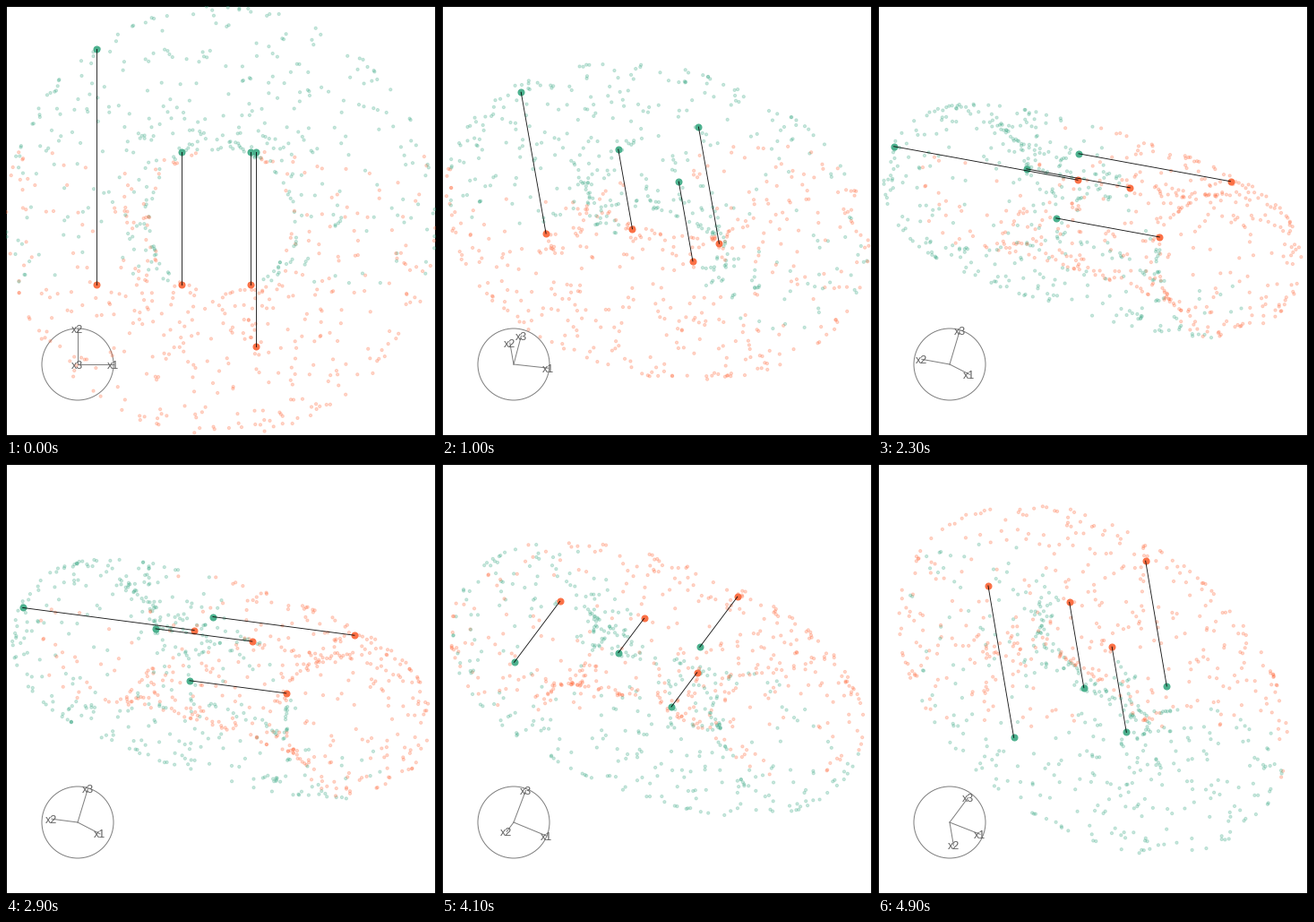
Recreate the animation shown at these times as a matplotlib script. Size 480x480 px, loop 5000 ms.

```python
import numpy as np
import matplotlib.pyplot as plt
from matplotlib.animation import FuncAnimation
from matplotlib.colors import to_rgba

SIZE, FRAMES, INTERVAL = 480, 50, 100
PX = 0.72  # points per pixel at 100 dpi
RING, TUBE, COUNT = 160, 80, 800
UPPER, LOWER = 77, -71
GREEN, ORANGE = "#3aa985", "#ff6a3c"
BIG_GREEN, BIG_ORANGE = "#4bb08d", "#fb7045"
HUB, ARM = np.array([80, 400]), 40


def basis(right, up):
    """Orthonormal 3x3 view from its two screen directions."""
    m = np.array([right, up, np.cross(right, up)])
    u, _, vt = np.linalg.svd(m)
    return u @ vt


def turn(a, b, t):
    """Constant-speed rotation from view a to view b; t may exceed 1."""
    d = b @ a.T
    angle = np.arccos(np.clip((np.trace(d) - 1) / 2, -1, 1))
    if angle < 1e-9:
        return a
    k = (d - d.T) / (2 * np.sin(angle))
    step = np.eye(3) + np.sin(angle * t) * k + (1 - np.cos(angle * t)) * k @ k
    return step @ a


def tour_stops():
    start = np.eye(3)
    tilt = basis((.972, -.106, .210), (-.106, .600, .793))
    side = basis((.832, -.469, .300), (-.225, .199, .953))
    far = basis((.623, -.728, .286), (-.323, .096, .943))
    back = basis((.897, -.312, .317), (-.322, .029, .947))
    under = basis((.921, -.195, .340), (-.377, -.259, .888))
    end = basis((.848, .107, .514), (-.332, -.646, .692))
    return [(0, start), (15, turn(start, tilt, 1.5)), (18, side),
            (25, turn(back, far, 1.5)), (29, far), (37, back),
            (41, under), (49, end)]


STOPS = tour_stops()


def view(frame):
    for (f0, a), (f1, b) in zip(STOPS, STOPS[1:]):
        if frame <= f1:
            return turn(a, b, (frame - f0) / (f1 - f0))
    return STOPS[-1][1]


def project(points, m):
    flat = points @ m[:2].T
    return np.column_stack([240 + flat[:, 0], 240 - flat[:, 1]])


def torus(rng):
    """Points uniform in both angles, so denser around the hole."""
    theta, phi = rng.uniform(-np.pi, np.pi, (2, COUNT))
    rho = RING + TUBE * np.cos(theta)
    return np.column_stack([rho * np.cos(phi), rho * np.sin(phi),
                            TUBE * np.sin(theta)])


cloud = torus(np.random.default_rng(7))
x, y, z = cloud.T
is_green = (y > UPPER) | ((y > LOWER) & (x * z < 0))

# Each link runs along x2: (x1, green x2, orange x2, x3)
LINKS = [(-139, 192, LOWER, 17.5), (-44, UPPER, LOWER, 36.7),
         (33, UPPER, LOWER, 1.6), (39, UPPER, -140, 79.3)]
green_ends = np.array([(a, g, c) for a, g, o, c in LINKS])
orange_ends = np.array([(a, o, c) for a, g, o, c in LINKS])

fig = plt.figure(figsize=(SIZE / 100, SIZE / 100), dpi=100, facecolor="white")
ax = fig.add_axes([0, 0, 1, 1])
ax.set(xlim=(0, SIZE), ylim=(SIZE, 0))
ax.axis("off")

# Half of the border stroke falls outside the stage, leaving one pixel
ax.add_patch(plt.Rectangle((0, 0), SIZE, SIZE, fill=False, ec="black",
                           lw=2 * PX, snap=False))
ax.add_patch(plt.Circle(HUB, ARM, fill=False, ec="#7f7f7f", lw=PX))

arms = [ax.plot([], [], color="#7f7f7f", lw=PX, zorder=2)[0] for _ in range(3)]
labels = [ax.text(0, 0, f"x{i + 1}", family="Liberation Sans", size=12.5 * PX,
                  color="#606060", ha="center", va="center", zorder=3)
          for i in range(3)]


def dots(points, colors, diameter, **style):
    return ax.scatter(points[:, 0], points[:, 1], s=(diameter * PX) ** 2,
                      c=colors, lw=PX, **style)


tints = [to_rgba(GREEN if g else ORANGE, .26) for g in is_green]
small = dots(cloud, tints, 3.2, zorder=4)
big_green = dots(green_ends, BIG_GREEN, 7, zorder=5)
big_orange = dots(orange_ends, BIG_ORANGE, 7, zorder=5)
links = [ax.plot([], [], color="black", lw=.9 * PX, alpha=.9, zorder=6)[0]
         for _ in LINKS]


def draw(frame):
    m = view(frame)
    small.set_offsets(project(cloud, m))
    tops, bottoms = project(green_ends, m), project(orange_ends, m)
    big_green.set_offsets(tops)
    big_orange.set_offsets(bottoms)
    for line, p, q in zip(links, tops, bottoms):
        line.set_data([p[0], q[0]], [p[1], q[1]])
    for i in range(3):
        tip = HUB + ARM * m[:2, i] * (1, -1)
        arms[i].set_data([HUB[0], tip[0]], [HUB[1], tip[1]])
        labels[i].set_position(tip + (-.3, 1.6))
    return [small, big_green, big_orange, *links, *arms, *labels]


anim = FuncAnimation(fig, draw, frames=FRAMES, interval=INTERVAL,
                     repeat=True, repeat_delay=0)
plt.show()
```
